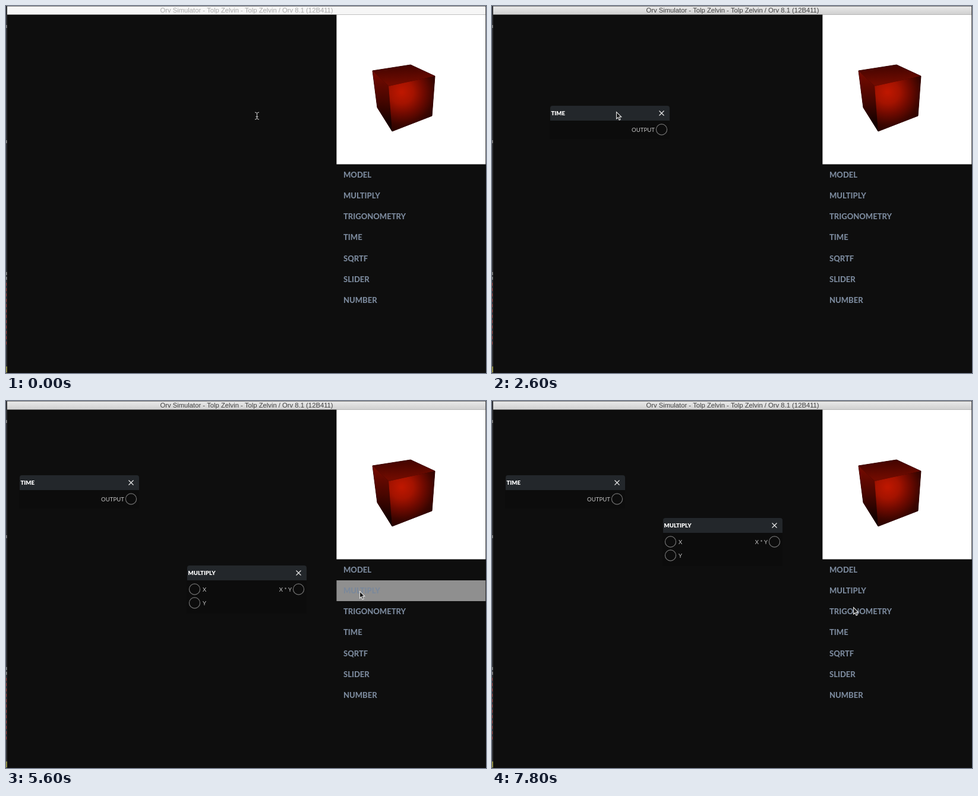
An HTML page with a canvas for the animation above (8 s loop, 808 by 618 pixels).

```html
<!DOCTYPE html>
<html lang="en">
<head>
<meta charset="utf-8">
<title>Node editor</title>
<style>
  html, body { margin: 0; width: 100%; height: 100%; overflow: hidden; background: #0e0e0e; }
  canvas { display: block; }
</style>
</head>
<body>
<canvas id="stage" width="808" height="618"></canvas>
<script>
const ctx = document.getElementById('stage').getContext('2d');
const LOOP = 8000, STEP = 200;
const SANS = 'Lato, sans-serif';
const MENU = ['MODEL', 'MULTIPLY', 'TRIGONOMETRY', 'TIME', 'SQRTF', 'SLIDER', 'NUMBER'];
const ARROW = new Path2D('M.5 .5v11.5l2.7-2.4 1.9 4.4 2-.9-1.9-4.2 3.6-.1z');
const IBEAM = new Path2D('M-3-6q3.5 0 3.5 2.5q0-2.5 3.5-2.5M.5-4v8M-3 6q3.5 0 3.5-2.5q0 2.5 3.5 2.5M-1.5 1.5h4');

const point = (x, y) => ({ x, y });
const mix = (a, b, p) => a + (b - a) * p;
const easeOut = p => 1 - (1 - p) ** 2.6;

// A node is pressed in the menu, appears at spawn and is dragged by its grip to home.
const NODES = [
  { title: 'TIME', inputs: [], output: 'OUTPUT', born: 1400, grab: 2200, drop: 3200,
    spawn: point(304, 288), home: point(22, 125), grip: point(112, 10) },
  { title: 'MULTIPLY', inputs: ['X', 'Y'], output: 'X * Y', born: 5600, grab: 6000, drop: 6800,
    spawn: point(304, 277), home: point(287, 197), grip: point(103, 1) }
];
const gripAt = (node, place) => point(place.x + node.grip.x, place.y + node.grip.y);

const [timeNode, multiplyNode] = NODES;
const menuRest = point(595, 320);
const ROUTE = [
  { t: 0, at: point(422, 185) },
  { t: 400, at: point(422, 185) },
  { t: timeNode.born, at: point(590, 384) },
  { t: 1800, at: point(439, 324) },
  { t: timeNode.grab, at: gripAt(timeNode, timeNode.spawn) },
  { t: timeNode.drop, at: gripAt(timeNode, timeNode.home) },
  { t: 4200, at: point(610, 419) },
  { t: 4800, at: menuRest },
  { t: multiplyNode.born, at: menuRest },
  { t: multiplyNode.grab, at: gripAt(multiplyNode, multiplyNode.spawn) },
  { t: multiplyNode.drop, at: gripAt(multiplyNode, multiplyNode.home) },
  { t: LOOP - STEP, at: point(608, 347) }
];

function pointerAt(t) {
  const next = ROUTE.findIndex(stop => stop.t >= t);
  if (next <= 0) return ROUTE[0].at;
  const a = ROUTE[next - 1], b = ROUTE[next];
  const p = easeOut((t - a.t) / (b.t - a.t));
  return point(mix(a.at.x, b.at.x, p), mix(a.at.y, b.at.y, p));
}

function rect(x, y, w, h, fill) {
  ctx.fillStyle = fill;
  ctx.fillRect(x, y, w, h);
}

function text(string, x, y, font, fill, align = 'left') {
  ctx.font = font;
  ctx.fillStyle = fill;
  ctx.textAlign = align;
  ctx.fillText(string, x, y);
}

function stroke(color, width, path) {
  ctx.strokeStyle = color;
  ctx.lineWidth = width;
  path ? ctx.stroke(path) : ctx.stroke();
}

function polygon(points, fill) {
  ctx.beginPath();
  points.forEach(({ x, y }) => ctx.lineTo(x, y));
  ctx.closePath();
  ctx.fillStyle = fill;
  ctx.fill();
}

function gradient(shape, ...colors) {
  colors.forEach((color, i) => shape.addColorStop(i / (colors.length - 1), color));
  return shape;
}

const between = (a, b, ...colors) =>
  gradient(ctx.createLinearGradient(a.x, a.y, b.x, b.y), ...colors);

function drawTitleBar(active) {
  const fill = active ? between(point(0, 0), point(0, 15), '#ebebeb', '#cecece') : '#f6f6f6';
  rect(2, 0.5, 805.3, 14, fill);
  text('Orv Simulator - Tolp Zelvin - Tolp Zelvin / Orv 8.1 (12B411)', 405, 11,
    '11.25px "Liberation Sans", sans-serif', active ? '#404040' : '#ababab', 'center');
}

// Sliver of the window behind, with clipped text
function drawBackdropEdge() {
  rect(0, 0, 2, 618, '#303236');
  for (const y of [32, 226, 448, 456]) rect(0, y, 1.5, 5, '#8c8c8c');
  for (let y = 466; y < 572; y += 9) rect(0, y, 1, 5, '#a23b38');
  rect(0, 607, 2, 10, '#8c8a43');
}

function drawCube() {
  rect(556.4, 14.5, 250.9, 252, '#fff');
  const left = point(617, 109), back = point(681, 99), right = point(722, 118);
  const front = point(644, 135), foot = point(650, 211);
  const leftFoot = point(625, 171), rightFoot = point(717, 185);

  polygon([left, back, right, rightFoot, foot, leftFoot], '#2e0300');
  stroke('#2e0300', 1);
  polygon([left, back, right, front], between(back, point(682, 129), '#420400', '#700b00'));
  polygon([left, front, foot, leftFoot],
    between(point(638, 118), point(632, 195), '#700a00', '#4a0600', '#160100'));
  polygon([front, right, rightFoot, foot],
    gradient(ctx.createRadialGradient(666, 145, 2, 666, 145, 72),
      '#bd1700', '#a41300', '#700a00', '#3c0500', '#1e0200'));
}

function drawMenu(t) {
  const pressed = NODES.find(node => node.born === t);
  MENU.forEach((label, i) => {
    const y = 284 + i * 35.3;
    if (pressed?.title === label) rect(556.4, Math.round(y - 17.5), 250.9, 35, '#8f8f8f');
    text(label, 568, y + 4.5, `800 13px ${SANS}`, '#7a889b');
  });
}

function drawPort(x, y) {
  ctx.beginPath();
  ctx.arc(x, y, 9.1, 0, Math.PI * 2);
  stroke('#727272', 1.2);
}

function drawNode(node, t) {
  if (t < node.born) return;
  const held = pointerAt(Math.min(Math.max(t, node.grab), node.drop));
  const label = (string, x, y, align) =>
    text(string, x, y + 3.5, `9.6px ${SANS}`, '#c4c4c4', align);
  ctx.save();
  ctx.translate(Math.round(held.x - node.grip.x), Math.round(held.y - node.grip.y));

  rect(0, 25, 202, 31 + Math.max(0, node.inputs.length - 1) * 25, '#0c0c0c');
  ctx.beginPath();
  ctx.roundRect(1, 0, 201, 25, [4, 4, 0, 0]);
  ctx.fillStyle = '#23272b';
  ctx.fill();
  text(node.title, 2.5, 15.5, `900 9.6px ${SANS}`, '#fff');
  stroke('#eee', 1.1, new Path2D('M184.5 8.5l8 8m0-8l-8 8'));

  label(node.output, 177, 40, 'right');
  drawPort(188.5, 40);
  node.inputs.forEach((name, i) => {
    const y = 40 + i * 23;
    drawPort(13.5, y);
    label(name, 27, y);
  });
  ctx.restore();
}

function drawPointer(t) {
  const { x, y } = pointerAt(t);
  ctx.save();
  ctx.translate(Math.round(x), Math.round(y));
  if (t < 400) {
    stroke('#d0d0d0', 1, IBEAM);
  } else {
    ctx.fillStyle = '#161616';
    ctx.fill(ARROW);
    stroke('#e4e4e4', 1.1, ARROW);
  }
  ctx.restore();
}

function draw(now) {
  const t = Math.floor((now % LOOP) / STEP) * STEP;
  rect(0, 0, 808, 618, '#0e0e0e');
  drawBackdropEdge();
  drawTitleBar(t >= timeNode.born);
  drawCube();
  drawMenu(t);
  NODES.forEach(node => drawNode(node, t));
  drawPointer(t);
  requestAnimationFrame(draw);
}
requestAnimationFrame(draw);
</script>
</body>
</html>
```
